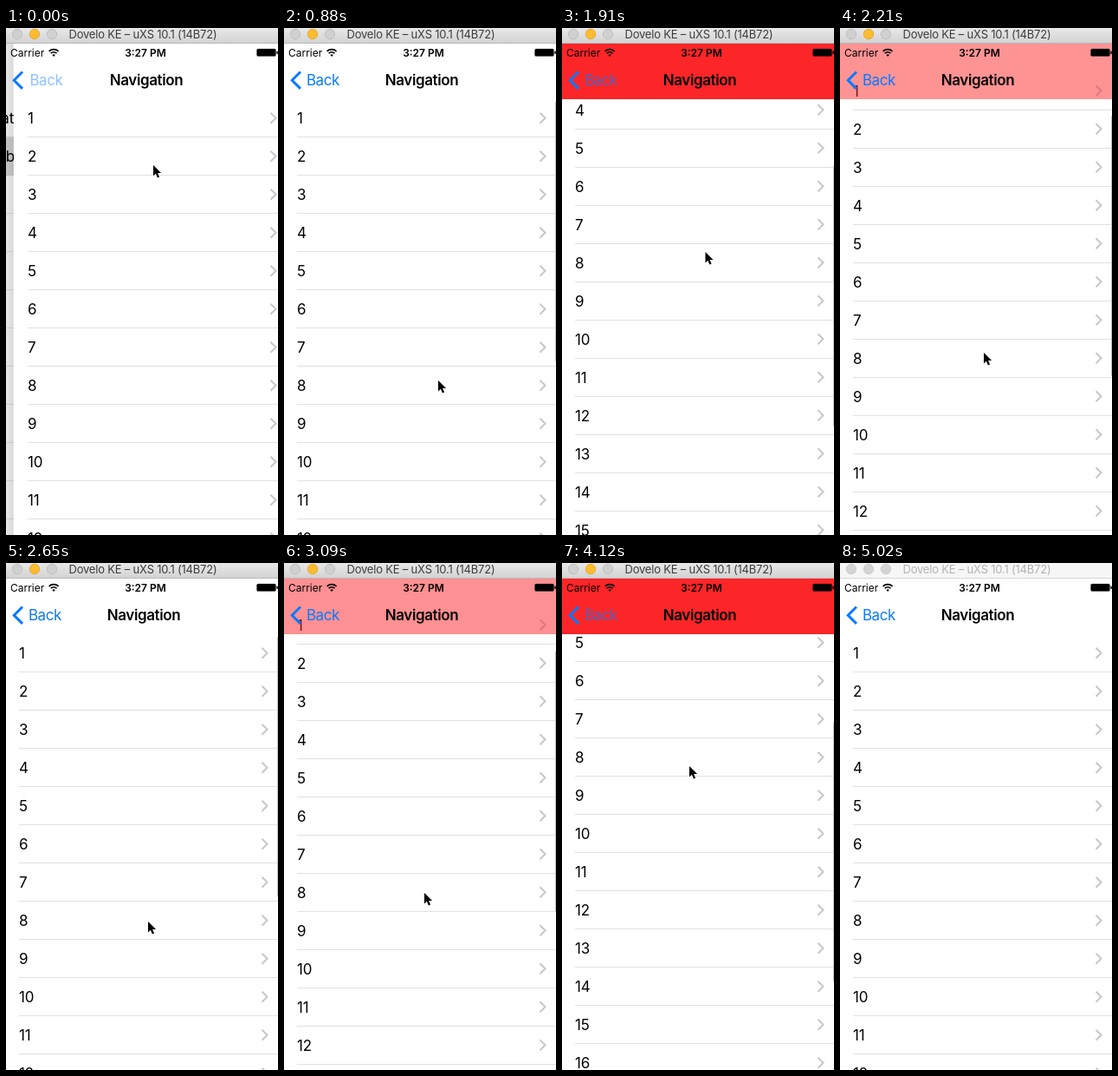
An HTML page for the animation above (5.12 s loop, 314x584 px).

```html
<!DOCTYPE html>
<html lang="en">
<head>
<meta charset="utf-8">
<title>Navigation bar fade</title>
<style>
  html, body { margin: 0; width: 100%; height: 100%; overflow: hidden; background: #fff; }
  svg { display: block; width: 100%; height: 100%; }
  text { font-family: Inter, "Liberation Sans", sans-serif; white-space: pre; }
  .row { font-size: 17px; letter-spacing: -.2px; }
</style>
</head>
<body>
<svg viewBox="0 0 314 584" xmlns="http://www.w3.org/2000/svg">
  <defs>
    <linearGradient id="chrome" x2="0" y2="1">
      <stop offset="0" stop-color="#e8e8e8"/>
      <stop offset="1" stop-color="#d2d2d2"/>
    </linearGradient>
    <linearGradient id="edge">
      <stop offset="0" stop-color="#000" stop-opacity="0"/>
      <stop offset="1" stop-color="#000" stop-opacity=".05"/>
    </linearGradient>
  </defs>
  <rect width="314" height="584" fill="#fff"/>

  <g id="under">
    <rect y="18" width="30" height="566" fill="#e6e6e6"/>
    <rect y="126" width="30" height="44" fill="#c3c3c3"/>
    <g id="underLines" fill="#b4b4b8"></g>
    <text class="row" x="9" y="110" text-anchor="end">at</text>
    <text class="row" x="10" y="154" text-anchor="end">b</text>
    <rect y="18" width="8" height="566" fill="url(#edge)"/>
  </g>

  <g id="page">
    <rect y="18" width="314" height="566" fill="#fff"/>
    <g id="list"></g>
  </g>
  <rect id="thumb" x="313" width="1" height="299" fill="#bdbdbd"/>

  <rect id="tint" y="18" width="314" height="64" fill="#fc2528"/>
  <path d="M19 50.5 9.3 60.2 19 69.9" fill="none" stroke="#0a7aff" stroke-width="3"/>
  <text id="back" y="66" font-size="17" letter-spacing="-.5" fill="#0a7aff">Back</text>
  <text id="heading" y="66" font-size="17" font-weight="600" letter-spacing="-.4" text-anchor="middle">Navigation</text>

  <text x="5" y="32.5" font-size="12">Carrier</text>
  <g fill="none" stroke="#000" stroke-width="1.7">
    <path d="M49.6 26.8a8 8 0 0 1 11 0M51.7 29.2a5 5 0 0 1 6.8 0"/>
    <path d="M55.1 33 53.3 31.1a2.6 2.6 0 0 1 3.6 0Z" fill="#000" stroke="none"/>
  </g>
  <text x="161" y="32.5" font-size="12" font-weight="600" text-anchor="middle">3:27 PM</text>
  <rect x="289.5" y="24" width="22" height="8.5" rx="1.5" stroke="#000" stroke-opacity=".3" stroke-width=".6"/>
  <rect x="312.4" y="26.5" width="1.4" height="3.6" rx=".7"/>

  <rect id="bar" width="314" height="18"/>
  <rect id="rim" y="17" width="314" height="1"/>
  <g id="lights" stroke-width=".8"></g>
  <text id="caption" x="158" y="12" font-size="13" letter-spacing="-.2" text-anchor="middle">Dovelo KE – uXS 10.1 (14B72)</text>

  <path id="pointer" d="M0 0V12.4L2.9 9.8 4.9 14.4 7.1 13.4 5.1 9H9.1Z" stroke="#fff" stroke-width="1.6" paint-order="stroke"/>
</svg>
<script>
const $ = id => document.getElementById(id);
const set = (el, attrs) => { for (const k in attrs) el.setAttribute(k, attrs[k]); };
const add = (parent, tag, attrs, text = '') => {
  const el = document.createElementNS('http://www.w3.org/2000/svg', tag);
  set(el, attrs);
  el.textContent = text;
  return parent.appendChild(el);
};

const LOOP = 5120, BLUR = 5020, ROW = 44, TOP = 82;

for (let n = 1; n <= 20; n++) {
  const y = TOP + (n - 1) * ROW;
  add($('list'), 'text', { class: 'row', x: 15, y: y + 28 }, n);
  add($('list'), 'path', { d: `M295.5 ${y + 15.8}l6 6-6 6`, fill: 'none', stroke: '#c7c7cc', 'stroke-width': 2 });
  add($('list'), 'rect', { x: 15, y: y + 43.5, width: 310, height: .5, fill: '#c3c3c7' });
  add($('underLines'), 'rect', { y: y + 43.5, width: 30, height: .5 });
}
const lights = [13, 33, 53].map(cx => add($('lights'), 'circle', { cx, cy: 7, r: 5.7 }));

const short = [0, 3, 6, 12, 16, 19, 23, 28];
const ticks = [0];
for (let i = 0; i < 32; i++) ticks.push(ticks[i] + (short.includes(i) ? 140 : 150));

// time, pointer x, pointer y, scroll offset
const keys = [
  [0, 170, 158, 0], [590, 176, 380, 0], [880, 178, 406, 0],
  [1470, 166, 183, 213.5], [1620, 165, 168, 229], [2210, 166, 374, 31.5],
  [2650, 164, 413, 0], [3090, 162, 380, 32.5], [3680, 148, 269, 153],
  [3980, 147, 234, 188], [4420, 153, 402, 14], [4570, 170, 472, 0], [4720, 210, 602, 0]
];

// Cubic through the keys, flat at turning points
function slope(i, c) {
  const a = keys[i - 1], b = keys[i], d = keys[i + 1];
  if (!a || !d) return 0;
  const p = (b[c] - a[c]) / (b[0] - a[0]), q = (d[c] - b[c]) / (d[0] - b[0]);
  return p * q > 0 ? 2 * p * q / (p + q) : 0;
}
function pose(t) {
  let i = 0;
  while (i < keys.length - 2 && keys[i + 1][0] <= t) i++;
  const a = keys[i], b = keys[i + 1], h = b[0] - a[0];
  const u = Math.min(1, (t - a[0]) / h), v = 1 - u;
  return [1, 2, 3].map(c =>
    v * v * (1 + 2 * u) * a[c] + u * u * (3 - 2 * u) * b[c] +
    h * u * v * (v * slope(i, c) - u * slope(i + 1, c)));
}

// The phone screen moves in half points
const snap = v => Math.round(v * 2) / 2;

function draw(time) {
  const t = ticks.filter(s => s <= time).pop();
  const [x, y, scroll] = pose(t).map(snap);
  const push = t === 0 ? 1 : 0;
  const alpha = Math.min(1, scroll / 64);

  set($('under'), { visibility: push ? 'visible' : 'hidden' });
  set($('page'), { transform: `translate(${push * 9})` });
  set($('list'), { transform: `translate(${push},${-scroll})` });
  set($('thumb'), { y: 85 + scroll * .523, opacity: t >= 290 && t < 4720 ? 1 : 0 });
  set($('tint'), { opacity: alpha });
  set($('back'), { x: 26 + push * 1.5, opacity: push ? .45 : 1 - .6 * Math.max(0, alpha - .5) });
  set($('heading'), { x: 159 + push * 3 });
  set($('pointer'), { transform: `translate(${x},${y})`, visibility: t < 4720 ? 'visible' : 'hidden' });

  const active = time < BLUR;
  set($('bar'), { fill: active ? 'url(#chrome)' : '#f6f6f6' });
  set($('rim'), { fill: active ? '#b9b9b9' : '#d6d6d6' });
  set($('caption'), { fill: active ? '#3c3c3c' : '#b2b2b2' });
  lights.forEach((c, i) => set(c, active && i === 1
    ? { fill: '#fdbc2f', stroke: '#dfa023' }
    : { fill: active ? '#d0d0d0' : '#d4d4d4', stroke: active ? '#b8b8b8' : '#c6c6c6' }));
}

const start = performance.now();
function tick() {
  draw((performance.now() - start) % LOOP);
  requestAnimationFrame(tick);
}
tick();
</script>
</body>
</html>
```
